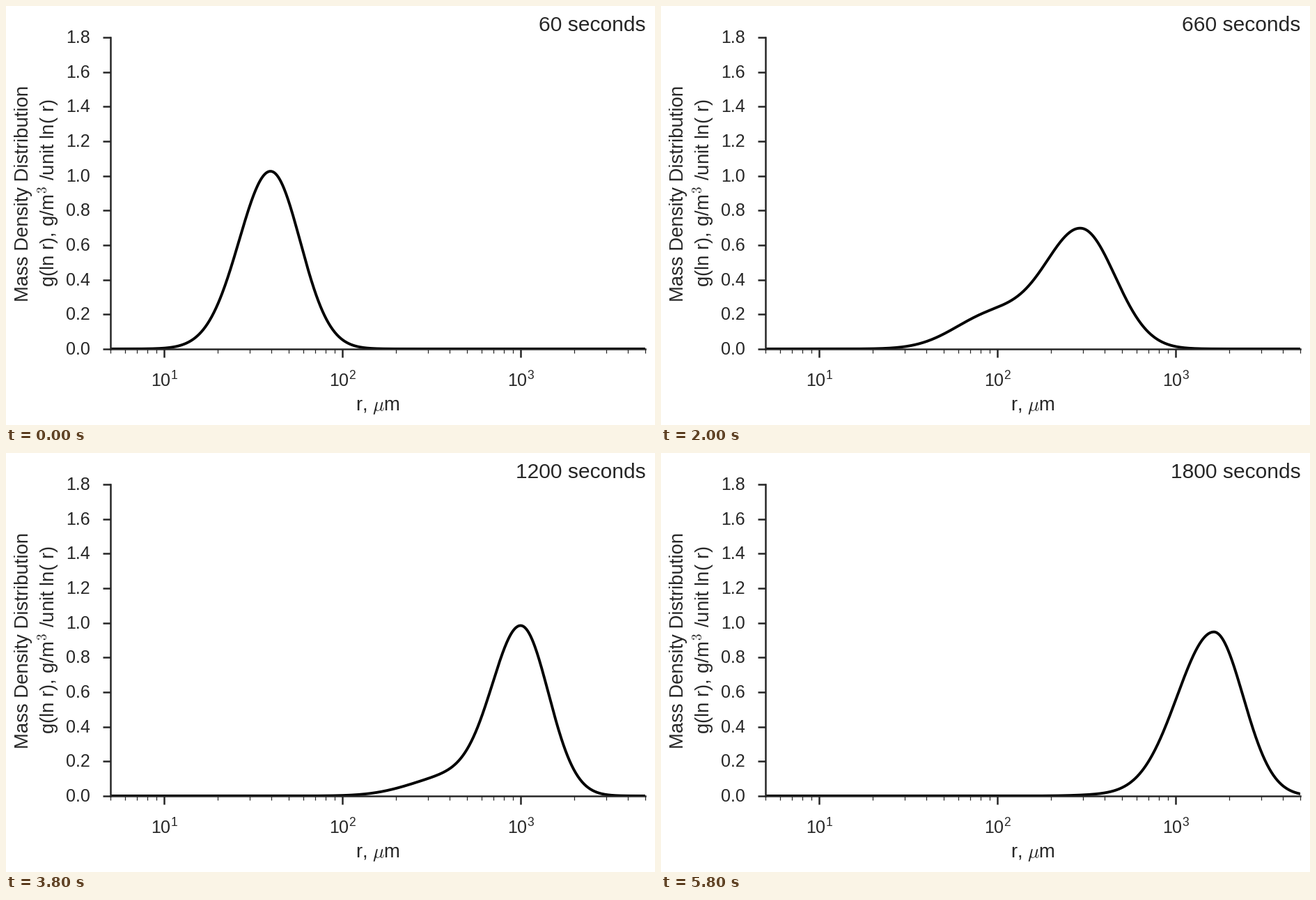
A matplotlib script that plays this animation: 932x601 px, repeating every 6 s.

```python
import numpy as np
import matplotlib.pyplot as plt
from matplotlib.animation import FuncAnimation

W, H, DPI = 932, 601, 64
LEFT, BASE, AX_W, AX_H = 150.3, 491.9, 768, 447
DECADE = AX_W / 3                       # pixels per decade of r
X10 = LEFT + DECADE * np.log10(10 / 5)  # pixel position of r = 10
INK = "0.15"
FRAMES, STEP_MS, STEP_S = 30, 200, 60
MASS = 113.4                            # constant area below the curve

# A skewed main mode absorbs a smaller mode of slower drops. Columns:
# time, main centre, left and right width, slow height, centre, width
KEYS = np.array([
    (60, 383, 43.5, 40.5, .3, 370, 48),
    (480, 519, 51.5, 55.5, .088, 385, 46),
    (840, 680, 54, 40, .295, 583, 62),
    (1080, 728, 45, 37.5, .16, 628, 60),
    (1320, 750, 40, 42, .075, 645, 55),
    (1560, 768, 44.5, 48.6, .02, 640, 50),
    (1800, 794, 53, 42, .006, 640, 40),
])
times, params = KEYS[:, 0], KEYS[:, 1:]


def pt(px):
    return px * 72 / DPI


def tangents():
    """Harmonic mean of neighbouring slopes, so nothing overshoots."""
    slope = np.diff(params, axis=0) / np.diff(times)[:, None]
    a, b = slope[:-1], slope[1:]
    same = a * b > 0
    mid = np.where(same, 2 * a * b / np.where(same, a + b, 1), 0)
    return np.vstack([.6 * slope[:1], mid, slope[-1:]])


rates = tangents()


def state(t):
    k = min(np.searchsorted(times, t, side="right") - 1, len(times) - 2)
    dt = times[k + 1] - times[k]
    u = (t - times[k]) / dt
    ease = u * u * (3 - 2 * u)
    return (params[k] * (1 - ease) + params[k + 1] * ease
            + dt * u * (1 - u) * ((1 - u) * rates[k] - u * rates[k + 1]))


def bell(x, centre, width):
    return np.exp(-.5 * ((x - centre) / width) ** 2)


xs = np.arange(LEFT - 1, LEFT + AX_W + 2)
radius = 10 ** (1 + (xs - X10) / DECADE)


def density(t):
    centre, left, right, slow, slow_x, slow_w = state(t)
    main = ((MASS - slow * slow_w * np.sqrt(2 * np.pi))
            / ((left + right) * np.sqrt(np.pi / 2)))
    width = np.where(xs < centre, left, right)
    return main * bell(xs, centre, width) + slow * bell(xs, slow_x, slow_w)


plt.rcParams.update({"font.family": "Liberation Sans",
                     "mathtext.fontset": "cm"})
fig = plt.figure(figsize=(W / DPI, H / DPI), dpi=DPI, facecolor="white")
ax = fig.add_axes([LEFT / W, 1 - BASE / H, AX_W / W, AX_H / H])
ax.set_xscale("log")
ax.set_xlim(5, 5000)
ax.set_ylim(0, 1.8)
ax.set_yticks(np.arange(10) * .2)
for side in ("top", "right"):
    ax.spines[side].set_visible(False)
for side in ("left", "bottom"):
    ax.spines[side].set(linewidth=pt(2.5), color=INK)
ax.tick_params(which="major", length=pt(11.5), width=pt(2.5), color=INK,
               labelleft=False, labelbottom=False)
ax.tick_params(which="minor", length=pt(5.5), width=pt(1.25), color=INK,
               labelbottom=False)


def label(x, y, text, size, ha="center", rotation=0):
    return fig.text(x / W, 1 - y / H, text, fontsize=pt(size), color=INK,
                    ha=ha, va="baseline", rotation=rotation,
                    rotation_mode="anchor")


for i in range(10):
    label(121.2, BASE - i * AX_H / 9 + 8.2, f"{i * .2:.1f}", 25, "right")
for n in (1, 2, 3):
    label(X10 + (n - 1) * DECADE, 547, rf"$\mathdefault{{10^{n}}}$", 25)
label(LEFT + AX_W / 2, 580, r"r, $\mu$m", 27.5)
label(32, 268.5, "Mass Density Distribution", 27.5, rotation=90)
label(70, 268.5, "g(ln r), g/m$^3$ /unit ln( r)", 27.5, rotation=90)

clock = label(LEFT + AX_W + .4, 35.5, "", 30, "right")
line, = ax.plot([], [], color="black", linewidth=pt(3.9))


def update(i):
    t = STEP_S * (i + 1)
    line.set_data(radius, density(t))
    clock.set_text(f"{t} seconds")
    return line, clock


anim = FuncAnimation(fig, update, frames=FRAMES, interval=STEP_MS,
                     repeat=True, repeat_delay=0, blit=False)
plt.show()
```
